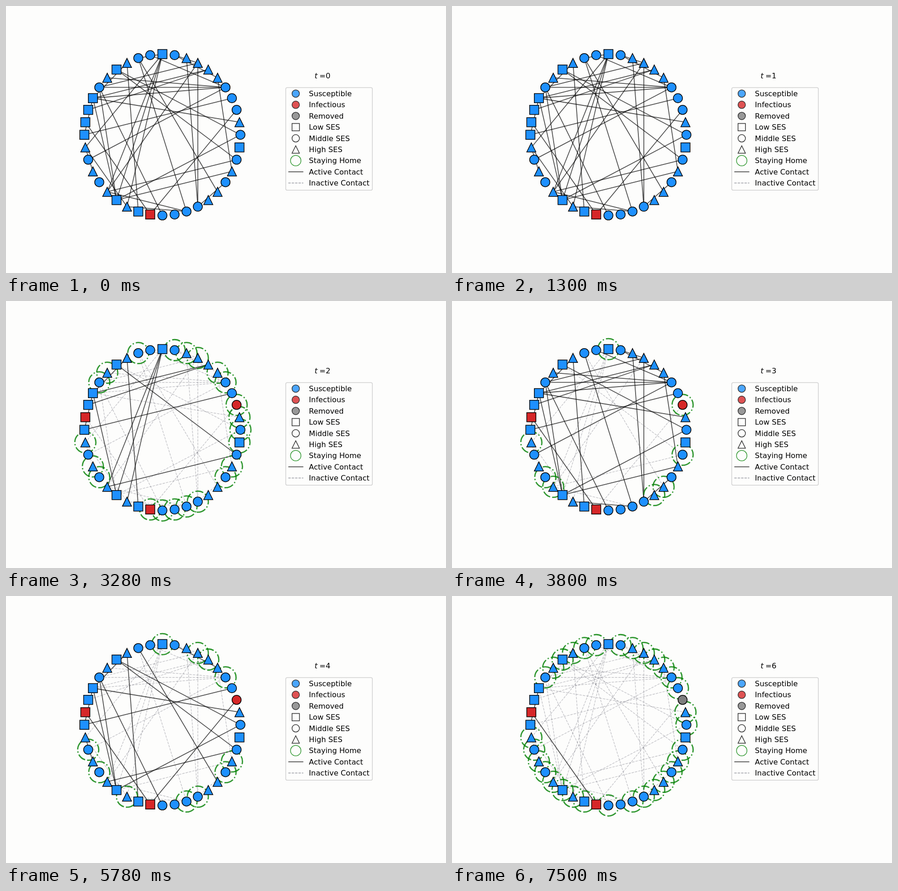
Recreate the animation shown at these times as an HTML page with a canvas. Size 961 by 583 pixels, loop 8000 ms.

```html
<!DOCTYPE html>
<html lang="en">
<head>
<meta charset="utf-8">
<title>Contact network</title>
<style>
  html, body { margin: 0; width: 100%; height: 100%; overflow: hidden; background: #fdfdfc; }
  canvas { display: block; }
</style>
</head>
<body>
<canvas id="stage" width="961" height="583"></canvas>
<script>
const ctx = document.getElementById('stage').getContext('2d');
const TAU = Math.PI * 2;
const FONT = '16.2px "DejaVu Sans", sans-serif';
const BLUE = '#1e90ff', RED = '#d62728', GRAY = '#7f7f7f';
const LOOP = 8000;
const FIRST_CASE = 29, NEW_CASES = [2, 19], REMOVED = 2;

// O: middle, T: high, S: low SES; counter-clockwise from the right
const SHAPES = 'OTOOOTTTTOSOOTSTOSSSSTOTOTSTSSOOOOTTOTOS';
const nodes = [...SHAPES].map((shape, i) => {
  const a = i / SHAPES.length * TAU;
  return { shape, x: 341.6 + 170.4 * Math.cos(a), y: 281.2 - 176.1 * Math.sin(a) };
});

// The network as walks: each neighbouring pair is one contact
const walks = [
  [15, 4, 16, 7, 9, 5, 37, 26, 0, 14, 38, 25, 10, 27, 32, 12],
  [11, 4, 17, 26, 10, 12, 35],
  [28, 13, 17, 20, 3],
  [8, 33, 7, 25, 32],
  [1, 17, 6, 18],
  [23, 21, 10], [30, 16, 26], [2, 29, 19],
  [22, 4], [21, 27], [33, 36]
];
const edges = walks.flatMap(walk => walk.slice(1).map((b, i) => [walk[i], b].sort((p, q) => p - q)));

// In a lockdown all but the low SES stay home, otherwise nobody does;
// the listed nodes do the opposite
const lockdown = step => step === 2 || step === 6;
const exceptions = {
  2: [3, 6, 11, 13, 22, 25, 27, 29, 34, 35, 38, 39],
  3: [2, 10, 21, 24, 25, 34, 35, 38],
  4: [4, 6, 7, 10, 22, 24, 27, 32, 33, 36, 37],
  5: [6, 8, 13, 24, 34, 35],
  6: [2, 14, 26, 28, 31]
};

function isHome(i, step) {
  const usual = lockdown(step) && nodes[i].shape !== 'S';
  return usual !== (exceptions[step] || []).includes(i);
}

const isRemoved = (i, step) => step === 6 && i === REMOVED;
const isIsolated = (i, step) => isHome(i, step) || isRemoved(i, step);

function nodeColor(i, step) {
  if (isRemoved(i, step)) return GRAY;
  return i === FIRST_CASE || (step >= 2 && NEW_CASES.includes(i)) ? RED : BLUE;
}

function line(x1, y1, x2, y2, color, width, dash = []) {
  ctx.strokeStyle = color;
  ctx.lineWidth = width;
  ctx.setLineDash(dash);
  ctx.beginPath();
  ctx.moveTo(x1, y1);
  ctx.lineTo(x2, y2);
  ctx.stroke();
  ctx.setLineDash([]);
}

function marker(shape, x, y, r, fill, stroke, width = 1.5) {
  ctx.beginPath();
  if (shape === 'O') ctx.arc(x, y, r, 0, TAU);
  else if (shape === 'S') ctx.rect(x - r, y - r, 2 * r, 2 * r);
  else {
    ctx.moveTo(x, y - r);
    ctx.lineTo(x + r, y + r);
    ctx.lineTo(x - r, y + r);
    ctx.closePath();
  }
  ctx.fillStyle = fill;
  ctx.fill();
  ctx.strokeStyle = stroke;
  ctx.lineWidth = width;
  ctx.stroke();
}

// Dash-dot ring running counter-clockwise from the bottom
function homeRing({ x, y }) {
  const width = 2.8;
  ctx.strokeStyle = 'rgba(0,128,0,.8)';
  ctx.lineWidth = width;
  ctx.setLineDash([6.4, 1.6, 1, 1.6].map(v => v * width));
  ctx.beginPath();
  ctx.arc(x, y, 23, TAU / 4, TAU / 4 - TAU, true);
  ctx.stroke();
  ctx.setLineDash([]);
}

function text(s, x, y, style = '') {
  ctx.font = style + FONT;
  ctx.fillStyle = '#000';
  ctx.fillText(s, x, Math.round(y));
}

function drawLegend() {
  ctx.beginPath();
  ctx.roundRect(611, 178.3, 189.2, 224, 3.2);
  ctx.strokeStyle = '#d1d1d1';
  ctx.lineWidth = 1.5;
  ctx.stroke();

  const r = 8.1, dark = '#333', none = 'transparent';
  const key = (shape, fill, stroke = dark, radius = r) =>
    y => marker(shape, 632.8, y, radius, fill, stroke);
  const rule = (...style) => y => line(616.6, y, 649.4, y, ...style);
  const rows = {
    'Susceptible': key('O', '#4ba6fe'),
    'Infectious': key('O', '#de5253'),
    'Removed': key('O', '#989898'),
    'Low SES': key('S', none),
    'Middle SES': key('O', none),
    'High SES': key('T', none),
    'Staying Home': key('O', none, '#339933', 11.4),
    'Active Contact': rule('#4c4c4c', 1.8),
    'Inactive Contact': rule('#999aa2', 1.5, [5.2, 2.2])
  };
  Object.entries(rows).forEach(([label, drawKey], i) => {
    const y = 191.3 + 24.4 * i;
    drawKey(y);
    text(label, 661.6, y + 5.7);
  });
}

function draw(step) {
  ctx.fillStyle = '#fdfdfc';
  ctx.fillRect(0, 0, 961, 583);

  for (const [a, b] of edges) {
    const p = nodes[a], q = nodes[b];
    const style = isIsolated(a, step) || isIsolated(b, step)
      ? ['rgba(20,20,40,.24)', 1.4, [5.2, 2.2]]
      : ['rgba(0,0,0,.68)', 1.8];
    line(p.x, p.y, q.x, q.y, ...style);
  }
  nodes.filter((n, i) => isHome(i, step)).forEach(homeRing);
  nodes.forEach((n, i) => marker(n.shape, n.x, n.y, 10, nodeColor(i, step), '#000'));

  text('t', 674, 158, 'italic ');
  text('=' + step, 684.6, 158);
  drawLegend();
}

// Steps last 1250 ms, their starts rounded up to tenths of a second
const stepAt = t => Math.floor(Math.floor(t / 100) * 100 / 1250);

let shown = -1;
function tick() {
  const step = stepAt(performance.now() % LOOP);
  if (step !== shown) draw(shown = step);
  requestAnimationFrame(tick);
}
tick();
</script>
</body>
</html>
```
